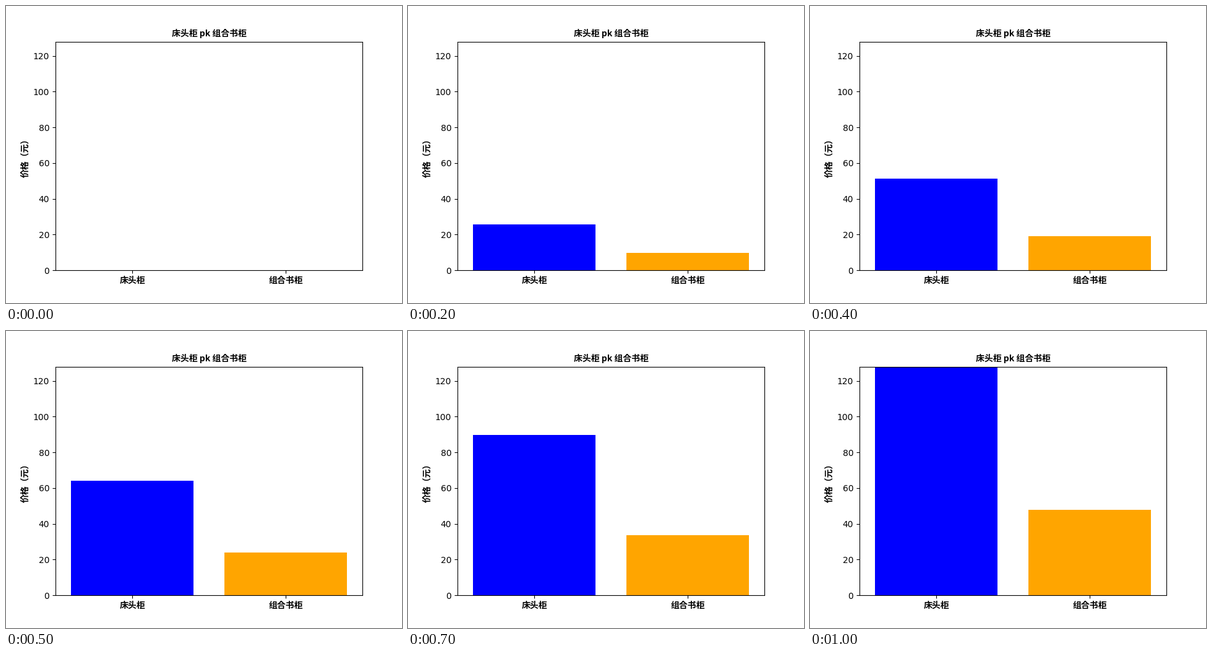
Write a matplotlib script that moves like this. It is 640 by 480 pixels and loops after 1.1 s.

```python
import matplotlib.pyplot as plt
from matplotlib.animation import FuncAnimation

NAMES = ["床头柜", "组合书柜"]
PRICES = [128, 48]
STEPS = 10
FONT = dict(family="Noto Sans CJK JP", size=10, weight="bold")

fig, ax = plt.subplots(figsize=(6.4, 4.8), dpi=100)
bars = ax.bar([0, 1], [0, 0], width=0.8, color=["blue", "orange"])

ax.set_xlim(-0.5, 1.5)
ax.set_ylim(0, max(PRICES))
ax.set_yticks(range(0, 121, 20))
ax.set_xticks([0, 1])
ax.set_xticklabels(NAMES, fontdict=FONT)
ax.set_ylabel("价格（元）", fontdict=FONT)
ax.set_title(" pk ".join(NAMES), fontdict=FONT)


def update(i):
    for bar, price in zip(bars, PRICES):
        bar.set_height(price * i / STEPS)
    return bars.patches


anim = FuncAnimation(fig, update, frames=STEPS + 1, interval=100,
                     repeat=True, repeat_delay=0)
plt.show()
```
